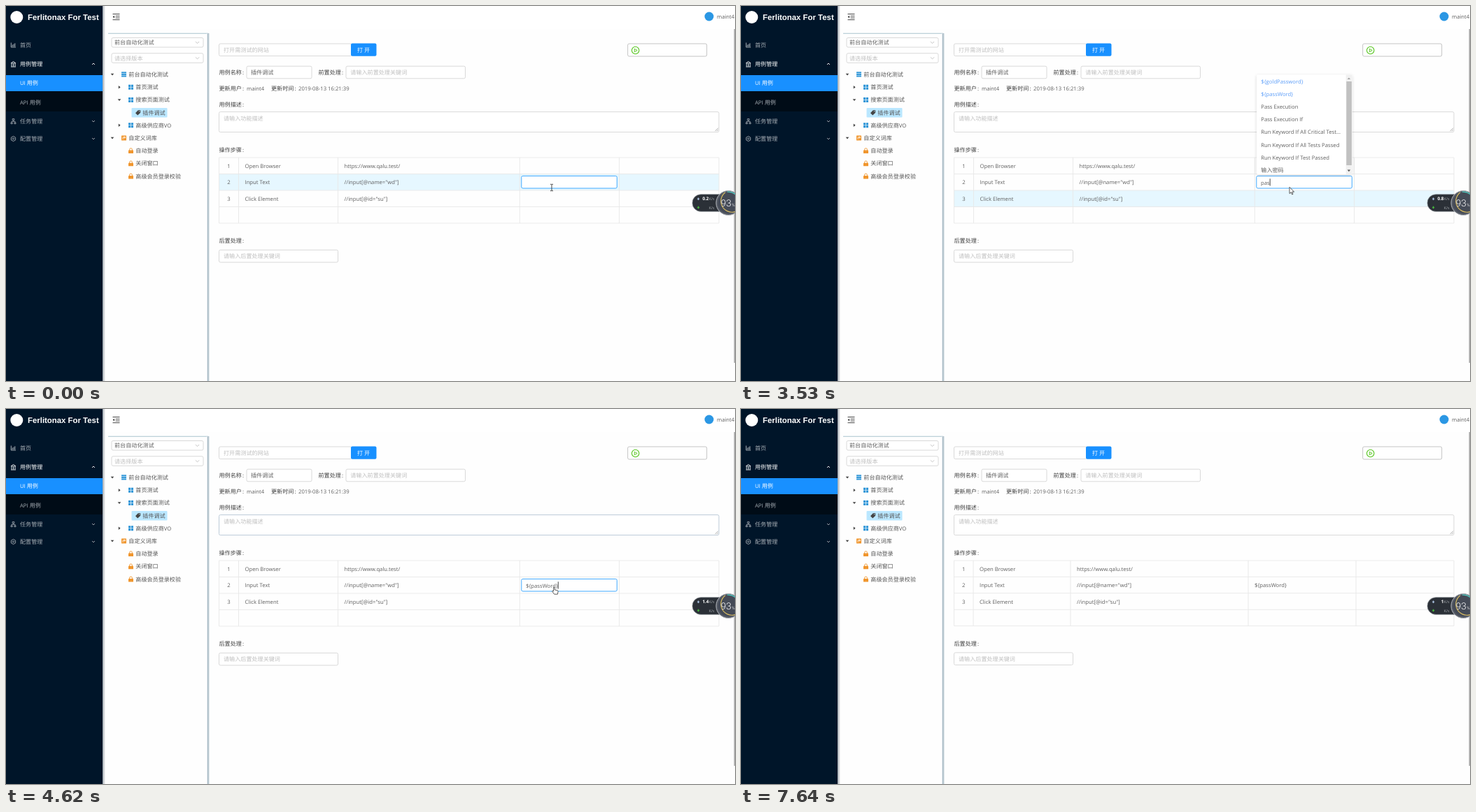
Write an HTML page that moves like this. It is 1042x537 px and loops after 7890 ms.

```html
<!DOCTYPE html>
<html lang="zh">
<head>
<meta charset="utf-8">
<title>Test steps</title>
<style>
  html, body { margin: 0; width: 100%; height: 100%; overflow: hidden; background: #fefefe; }
  svg { display: block; }
  text { text-rendering: geometricPrecision; }
  .han { font: 8.1px "Noto Sans CJK SC", "Noto Sans CJK JP", "Noto Sans CJK", sans-serif; }
  .lat { font: 7.7px "Open Sans", "Noto Sans", sans-serif; }
</style>
</head>
<body>
<svg id="stage" width="1042" height="537" viewBox="0 0 1042 537"></svg>
<script>
const LOOP = 7890;
const BLUE = '#1890ff', DARK = '#404040', GREY = '#5f5f5f', HINT = '#bfbfbf', MENU = '#a6adb4';
const ORANGE = '#f0962e', TREE = '#2f96d8', EDGE = '#d9d9d9', RULE = '#e8e8e8';

// ---- drawing helpers: each returns markup; text y is the middle of the line
const runs = s => s.match(/[\x20-\x7e]+|[^\x20-\x7e]+/g)
  .map(r => `<tspan class="${r.charCodeAt(0) < 127 ? 'lat' : 'han'}">${r}</tspan>`).join('');
const text = (x, y, s, fill = GREY, more = '') =>
  `<text x="${x}" y="${y + 2.9}" fill="${fill}" ${more}>${runs(s)}</text>`;
const rect = (x, y, w, h, fill, more = '') =>
  `<rect x="${x}" y="${y}" width="${w}" height="${h}" fill="${fill}" ${more}/>`;
const path = (d, stroke, w = 1, fill = 'none') =>
  `<path d="${d}" stroke="${stroke}" stroke-width="${w}" fill="${fill}"/>`;
const disc = (x, y, r, fill, more = '') => `<circle cx="${x}" cy="${y}" r="${r}" fill="${fill}" ${more}/>`;
const field = (x, y, w, h, stroke = EDGE, more = '') =>
  rect(x, y, w, h, '#fff', `rx="2" stroke="${stroke}" ${more}`);
const label = (x, y, s) => text(x, y, s, DARK) + text(x + 33.4, y, ':', DARK);
const chevron = (x, y, k, color, dir = 1) =>
  path(`M${x - k} ${y - dir * k / 2}L${x} ${y + dir * k / 2}L${x + k} ${y - dir * k / 2}`, color, .9);
const group = (id, body, more = '') => `<g id="${id}" ${more}>${body}</g>`;

function sidebar() {
  return rect(0, 0, 138, 537, '#001529') + rect(0, 99, 138, 52, '#000c17') + rect(0, 99, 138, 23, BLUE) +
    disc(15.3, 16, 9, '#fff') +
    `<text x="31" y="19.8" fill="#fff" font-family="Liberation Sans, Arial, sans-serif"
      font-weight="700" font-size="11.4">Ferlitonax For Test</text>` +
    path('M7.3 52.5V59H14M9.2 58V55.5M11 58V54.5M12.8 58V53.3', MENU, 1) +
    path('M7 82L10.5 79.5L14 82ZM8 83V86.4M10.5 83V86.4M13 83V86.4M7 87H14', '#fff', .9) +
    path('M9.2 161.5H11.8V163.7H9.2ZM10.5 163.7V165.3M8 167V165.3H13V167M7 167H9.2V168.7H7ZM11.9 167H14V168.7H11.9Z', MENU, .8) +
    path('M10.5 186.5L13.6 188.3V191.9L10.5 193.7L7.4 191.9V188.3Z', MENU, .9) +
    disc(10.5, 190.1, 1.2, 'none', `stroke="${MENU}" stroke-width=".8"`) +
    text(20, 56, '首页', MENU) + text(20, 83, '用例管理', '#fff', 'font-weight="500"') +
    text(20, 110.5, 'UI 用例', '#fff') + text(20, 138, 'API 用例', MENU) +
    text(20, 165, '任务管理', MENU) + text(20, 190, '配置管理', MENU) +
    chevron(125, 83, 2, '#fff', -1) + chevron(125, 165, 2, MENU) + chevron(125, 190, 2, MENU);
}

function header() {
  return rect(138, 33, 904, 5, 'url(#down)') + rect(138, 0, 904, 33, '#fff') +
    rect(138, 0, 4, 537, 'url(#side)') +
    path('M152.5 11.5H162.5M156.5 14.3H162.5M156.5 17H162.5M152.5 19.7H162.5', '#444', 1) +
    path('M155 13.6V17.6L152.6 15.6Z', 'none', 0, '#444') +
    disc(1005, 15, 6.5, '#2b97e4') + text(1016, 15, 'maint4') +
    rect(1040.6, 33, 1.4, 478, '#a6a6a6');
}

const caret = (x, y, open) =>
  path(open ? `M${x - 2.3} ${y - 1.2}h4.6l-2.3 2.8Z` : `M${x - 1.2} ${y - 2.3}v4.6l2.8 -2.3Z`, 'none', 0, '#444');
const bars = (x, y) => [0, 1, 2].map(i => rect(x, y - 3.7 + i * 2.6, 7, 2, TREE)).join('');
const tiles = (x, y) => [0, 1, 2, 3]
  .map(i => rect(x + i % 2 * 3.8, y - 3.5 + (i >> 1) * 3.8, 3.2, 3.2, TREE)).join('');
const lock = (x, y) => rect(x, y - .6, 7, 4.4, ORANGE, 'rx=".5"') +
  path(`M${x + 1.6} ${y}v-1.6a1.9 1.9 0 0 1 3.8 0v1.6`, ORANGE, .9);
const book = (x, y) => rect(x, y - 3.5, 7, 7, ORANGE, 'rx=".6"') +
  path(`M${x + 2} ${y + 2}v-3.6M${x + 3.4} ${y - 1.6}h2v1.6h-2Z`, '#fff', .8);
const tag = (x, y) => path(`M${x} ${y + .6}l3.8 -4h3.4v3.6l-4 3.8Z`, 'none', 0, '#444') + disc(x + 5.6, y - 1.7, .7, '#bae7ff');

function tree() {
  // middle, caret x, open, icon, icon x, name
  const rows = [
    [152, 1, bars, 165, '前台自动化测试'], [162, 0, tiles, 175, '首页测试'],
    [162, 1, tiles, 175, '搜索页面测试'], [0, 0, tag, 185, '插件调试'],
    [162, 0, tiles, 175, '高级供应商VO'], [152, 1, book, 165, '自定义词库'],
    [0, 0, lock, 175, '自动登录'], [0, 0, lock, 175, '关闭窗口'], [0, 0, lock, 175, '高级会员登录校验']
  ];
  return path('M146 39.3H289', '#a9c3cd', 1.1) + path('M289 39V537', '#e2e9ed', 4) +
    path('M288.8 39V537', '#a5b8c2', 1.5) +
    field(151, 45.5, 131, 13.5) + text(155, 52.3, '前台自动化测试') + chevron(273.5, 52.3, 2.6, HINT) +
    field(151, 67.8, 131, 13.5) + text(155, 74.6, '请选择版本', HINT) + chevron(273.5, 74.6, 2.6, HINT) +
    rect(179.5, 146, 51, 13.5, '#bae7ff', 'rx="1"') +
    rows.map(([cx, open, icon, ix, name], i) => {
      const y = 98 + i * 18.2;
      return (cx ? caret(cx, y, open) : '') + icon(ix, y) + text(ix + 10.3, y, name, '#555');
    }).join('');
}

function form() {
  return field(304.5, 54, 190, 17.5) + text(311, 62.7, '打开需测试的网站', HINT) +
    rect(493, 53.5, 36.5, 18.2, BLUE, 'rx="2"') + text(502, 62.7, '打 开', '#fff', 'font-weight="500"') +
    field(888.7, 54, 113, 18, '#c4c4c4') + disc(899.7, 63.5, 5.2, 'none', 'stroke="#52c41a" stroke-width="1.1"') +
    path('M898.3 61.2V65.8L902.2 63.5Z', '#52c41a', .9) +
    label(304.5, 95, '用例名称') + field(344, 86.2, 93, 17.6) + text(350, 95, '插件调试') +
    label(446.5, 95, '前置处理') + field(486, 86.2, 170.5, 17.6) + text(492.3, 95, '请输入前置处理关键词', HINT) +
    label(304.5, 118, '更新用户') + text(344, 118, 'maint4') +
    label(379, 118, '更新时间') + text(418, 118, '2019-08-13 16:21:39') +
    label(304.5, 140.6, '用例描述') + field(304.5, 151.6, 714.5, 29, EDGE, 'id="area"') +
    text(311, 160.6, '请输入功能描述', HINT) + path('M1013.5 179.2L1018 174.7M1016 179.2L1018 177.2', '#999', .8) +
    label(304.5, 206, '操作步骤') +
    group('after', label(304.5, 336.3, '后置处理') + field(304.5, 349.4, 170, 17.6) +
      text(311, 358.2, '请输入后置处理关键词', HINT));
}

function table(cols, step, last) {
  const cells = [['Open Browser', 'https://www.qalu.test/'], ['Input Text', '//input[@name="wd"]', last],
    ['Click Element', '//input[@id="su"]']];
  const bottom = 217 + 4 * step;
  let d = '';
  for (let i = 0; i < 5; i++) d += `M304.5 ${217 + i * step}H1019`;
  for (const x of [304.5, ...cols, 1019]) d += `M${x} 217V${bottom}`;
  return path(d, RULE, .9) + cells.map((row, i) => {
    const y = 217.3 + (i + .5) * step;
    return text((304.5 + cols[0]) / 2, y, String(i + 1), GREY, 'text-anchor="middle"') +
      row.map((s, k) => s ? text(cols[k] + 9, y, s) : '').join('');
  }).join('');
}

function popup() {
  const items = ['${goldPassword}', '${passWord}', 'Pass Execution', 'Pass Execution If',
    'Run Keyword If All Critical Test...', 'Run Keyword If All Tests Passed',
    'Run Keyword If Test Passed', '输入密码'];
  return rect(737, 98.5, 136.5, 142.5, '#fff', 'rx="2" filter="url(#soft)"') +
    `<g clip-path="url(#list)">${group('items', items.map((s, i) =>
      text(743.3, 107.6 + i * 18.2, s, i < 2 ? '#5a9cf8' : GREY)).join(''))}</g>` +
    rect(864.7, 98.5, 8.8, 142.5, '#f1f1f1') + rect(865.3, 108, 7.6, 120, '#c1c1c1', 'id="thumb"') +
    '<path id="upTip" d="M866.7 105h4.4l-2.2 -2.6Z"/><path id="downTip" d="M866.7 234.6h4.4l-2.2 2.6Z"/>';
}

function meter() {
  const num = (id, y) => `<text id="${id}" x="1004.5" y="${y}" text-anchor="end" fill="#fff"
    font-family="Open Sans, sans-serif" font-weight="700" font-size="6.4"></text>` +
    `<text x="1004.8" y="${y}" fill="#a4a8ad" font-family="Open Sans, sans-serif" font-size="5.4">K/s</text>`;
  return rect(981, 269.7, 52, 24.6, '#2b3037', 'rx="12.3" stroke="#8d9298" stroke-width=".7"') +
    path('M987.6 276.5l2 -2.2l2 2.2h-1.2v1.6h-1.6v-1.6Z', 'none', 0, '#a9bfdd') +
    path('M987.6 288.3l2 2.2l2 -2.2h-1.2v-1.6h-1.6v1.6Z', 'none', 0, '#46b83c') +
    num('up', 278.4) + num('down', 290.9) +
    disc(1032.5, 282, 17.5, '#555b66', 'stroke="#b4b7bc" stroke-width="1"') +
    disc(1032.5, 282, 15, '#454b57') +
    path('M1031 266.2A15.8 15.8 0 0 1 1048 279', '#4fd0c4', 1.2) +
    path('M1028 266.9A15.8 15.8 0 0 0 1042 294.6', '#d9bd62', 1.2) +
    `<text x="1021.8" y="287" fill="#fff" font-family="Roboto, sans-serif" font-weight="300" font-size="13.6">93</text>
     <text x="1037.2" y="287" fill="#ddd" font-family="Roboto, sans-serif" font-size="6">%</text>`;
}

function pointers() {
  const ink = 'stroke="#333" stroke-width=".8" stroke-linejoin="round"';
  return group('beam', path('M-2 -4.7H-.6L0 -4.2L.6 -4.7H2M-2 4.7H-.6L0 4.2L.6 4.7H2M0 -4.2V4.2', '#333', .9)) +
    group('arrow', `<path d="M0 0V9.3L2.1 7.4L3.6 10.6L5 10L3.6 6.9H6.6Z" fill="#fff" ${ink}/>`) +
    group('hand', `<path d="M-.9 .9a.9 .9 0 0 1 1.8 0V4.2L4.8 5Q5.7 5.3 5.6 6.4L4.9 10.4H.2L-2.7 6.6Q-2.8 5.3 -1.7 5.6L-.9 6.4Z" fill="#fff" ${ink}/>`);
}

document.getElementById('stage').innerHTML = `<defs>
  <linearGradient id="down" x2="0" y2="1"><stop stop-color="#001529" stop-opacity=".16"/><stop offset="1" stop-color="#001529" stop-opacity="0"/></linearGradient>
  <linearGradient id="side"><stop stop-color="#001529" stop-opacity=".38"/><stop offset="1" stop-color="#001529" stop-opacity="0"/></linearGradient>
  <filter id="soft" x="-10%" y="-10%" width="120%" height="120%"><feDropShadow dx="0" dy="1" stdDeviation="2" flood-opacity=".15"/></filter>
  <clipPath id="list"><rect x="737" y="98.5" width="127" height="142.5"/></clipPath></defs>` +
  rect(0, 0, 1042, 537, '#fefefe') + header() + tree() + sidebar() + form() +
  [2, 3, 4].map(n => rect(304.5, 217 + (n - 1) * 23.5, 714.5, 23.5, '#e6f7ff', `id="row${n}"`)).join('') +
  group('editing', table([332.5, 474.5, 734.3, 876.5], 23.5) +
    field(736.8, 243.4, 136.5, 17.6, '#40a9ff') + text(743, 252.6, ' ', GREY, 'id="typed"') +
    rect(743, 247.3, .9, 10.2, '#333', 'id="bar"')) +
  group('saved', table([332, 471, 725, 879], 23.4, '${passWord}')) +
  group('popup', popup()) + meter() + pointers();

// ---- timeline: each value holds until the next key
const keys = {
  rows: {
    2: [[0, 1], [550, .6], [670, .25], [790, 0], [3680, .9], [3800, .4], [3920, 0]],
    3: [[0, 0], [550, .4], [670, .75], [790, 1], [3680, .3], [3800, 0]],
    4: [[0, 0], [4780, .6], [4900, .25], [5040, 0]]
  },
  typed: [[0, ''], [1740, 'p'], [1870, 'pa'], [2140, 'pas'], [4500, '${passWord}']],
  bar: [[0, 0], [550, 1], [1070, 0], [1620, 1], [2700, 0], [3240, 1], [3680, 0], [4070, 1], [5040, 0]],
  popup: [[0, 0], [2980, .5], [3110, 1], [4500, 0]],
  scroll: [[0, 0], [3680, 3.5]],
  area: [[0, EDGE], [4500, '#7fbdf0'], [4620, '#bccbd8'], [4780, EDGE]],
  speed: [[0, '0.2', '3.8'], [120, '0.3', '3.5'], [1190, '0.4', '3.1'], [2140, '0.2', '3.4'], [3240, '0.8', '4.6'],
    [4220, '1.4', '6.6'], [5170, '1.7', '5.9'], [6140, '2.1', '6.7'], [7090, '1', '3.8']],
  pointer: [[0, 'beam', 780, 260], [550, 'arrow', 785, 263], [670, 'arrow', 789, 265], [790, 'arrow', 790.5, 266.3],
    [3530, 'arrow', 784, 259.3], [3680, 'hand', 787, 158.5], [3800, 'hand', 783, 133], [3920, 'hand', 780, 121],
    [4500, 'hand', 781, 166], [4620, 'hand', 783.5, 254.8], [4780, 'arrow', 788, 300], [4900, 'arrow', 790, 338],
    [5040, 'arrow', 789, 357], [5580, 'arrow', 788, 352], [5700, 'arrow', 788, 346], [5820, 'arrow', 788, 340],
    [5940, 'arrow', 788, 337], [6270, 'arrow', 795, 342], [6420, 'arrow', 808, 352], [6570, 'arrow', 833, 376],
    [6690, ''], [7370, 'arrow', 1007, 534], [7500, 'arrow', 1018, 534], [7640, '']]
};
const BLUR = 5450;
const barX = { '': 743, p: 747.8, pa: 752, pas: 755.7, '${passWord}': 788.8 };

const $ = id => document.getElementById(id);
const set = (id, name, value) => $(id).setAttribute(name, value);
const show = (id, on) => set(id, 'display', on ? 'inline' : 'none');
const at = (list, t) => list.findLast(k => k[0] <= t);

function draw(t) {
  for (const n in keys.rows) set('row' + n, 'opacity', at(keys.rows[n], t)[1]);
  show('editing', t < BLUR);
  show('saved', t >= BLUR);
  set('after', 'transform', `translate(0 ${t < BLUR ? 0 : -.5})`);

  const typed = at(keys.typed, t)[1];
  $('typed').firstChild.textContent = typed;
  set('bar', 'x', barX[typed]);
  show('bar', at(keys.bar, t)[1]);
  set('area', 'stroke', at(keys.area, t)[1]);

  const open = at(keys.popup, t)[1], scroll = at(keys.scroll, t)[1];
  show('popup', open);
  set('popup', 'opacity', open);
  set('items', 'transform', `translate(0 ${-scroll})`);
  set('thumb', 'y', 108 + scroll * .85);
  set('upTip', 'fill', scroll ? '#505050' : '#a3a3a3');
  set('downTip', 'fill', scroll ? '#a3a3a3' : '#505050');

  const [, up, down] = at(keys.speed, t);
  $('up').textContent = up;
  $('down').textContent = down;

  const [, kind, x, y] = at(keys.pointer, t);
  for (const id of ['beam', 'arrow', 'hand']) show(id, id === kind);
  if (kind) set(kind, 'transform', `translate(${x} ${y})`);
}

function tick() {
  draw(performance.now() % LOOP);
  requestAnimationFrame(tick);
}
tick();
</script>
</body>
</html>
```
